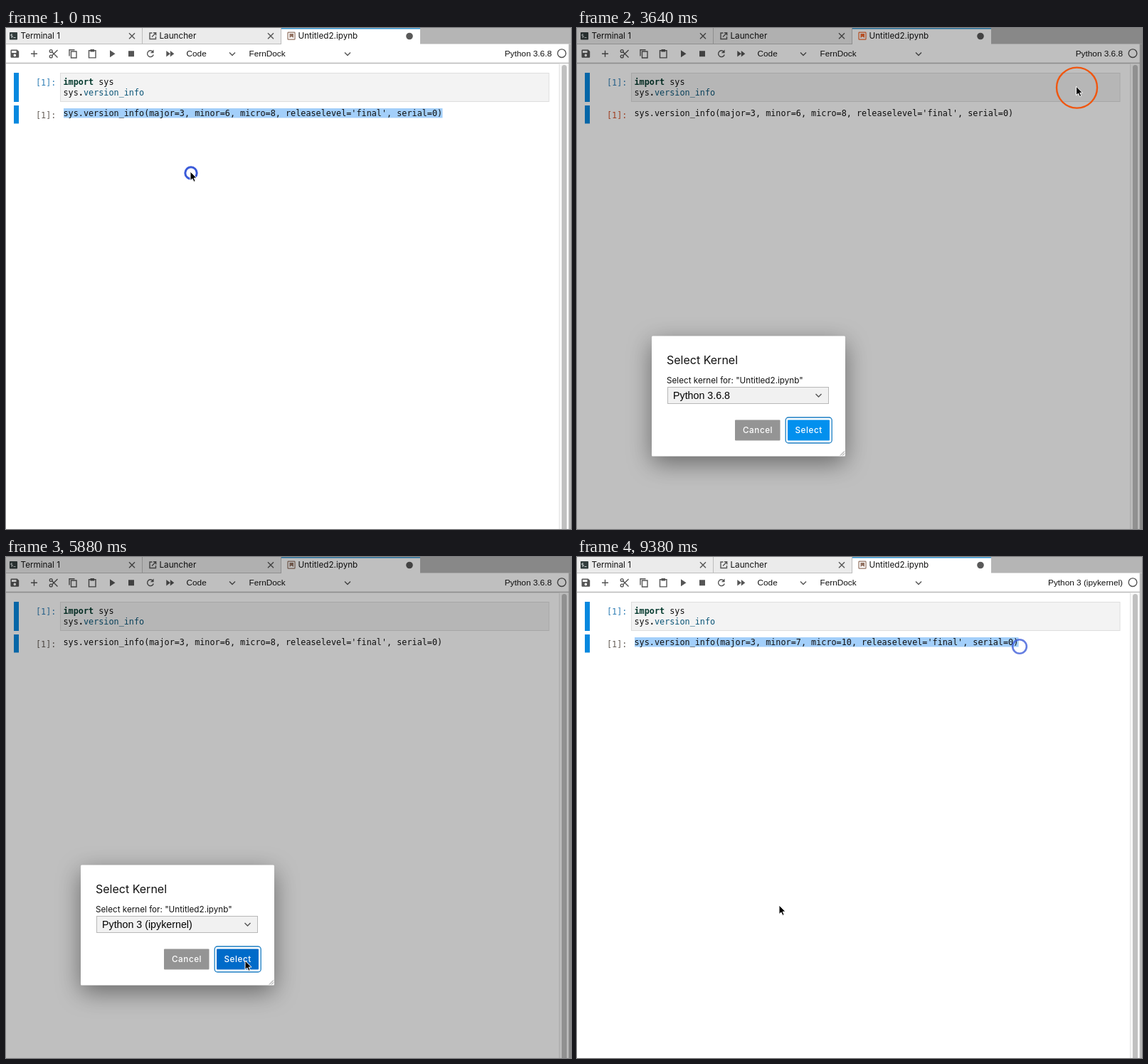
An HTML page that plays this animation: 794 by 705 pixels, repeating every 9510 ms.

```html
<!DOCTYPE html>
<html lang="en">
<head>
<meta charset="utf-8">
<title>Switching a notebook kernel</title>
<style>
  html, body { margin: 0; width: 100%; height: 100%; overflow: hidden; background: #fff; }
  svg { display: block; }
  text { white-space: pre; }
  .ui { font: 11.7px Inter, "Open Sans", sans-serif; }
  .bar { font: 11.8px "Liberation Sans", Arial, sans-serif; }
  .code { font: 11.8px "DejaVu Sans Mono", monospace; }
  .line { fill: none; stroke: #555; stroke-width: 1.4; }
</style>
</head>
<body>
<svg width="794" height="705" viewBox="0 0 794 705">
  <defs>
    <clipPath id="lensClip"><rect id="lensBox"/></clipPath>
    <filter id="shadow" x="-40%" y="-50%" width="180%" height="220%">
      <feDropShadow dx="0" dy="10" stdDeviation="17" flood-opacity=".45"/>
    </filter>
    <path id="cross" class="line" d="M-4-4 4 4M4-4-4 4"/>
    <path id="chevron" class="line" d="M-4-2 0 2 4-2"/>
  </defs>

  <g id="page">
    <rect width="794" height="705" fill="#fff"/>
    <rect width="794" height="22.5" fill="#b5b5b5"/>
    <rect width="387" height="22.5" fill="#ebebeb"/>
    <path d="M0 22.5H387M191.5 0V22M386.5 0V22" stroke="#bdbdbd" fill="none"/>
    <rect x="387" width="195" height="24" fill="#fff"/>
    <rect x="387" width="195" height="1.5" fill="#3796cf"/>

    <!-- tabs -->
    <rect x="5" y="6" width="11" height="10.5" rx=".8" fill="#333d3d"/>
    <path d="M9 9H7v2h2v2H7M10.5 13.5h3" stroke="#dfe6e6" stroke-width=".9" fill="none"/>
    <path class="line" stroke-width="1.2" d="M205.5 7H202v8.5h8.5V12M207 6.8h3.7v3.7M210.5 7 205 12.5"/>
    <g id="bookIcon">
      <rect x="396" y="6.2" width="10" height="10" rx=".8" fill="none" stroke="currentColor" stroke-width="1.2"/>
      <path d="M398.5 8h5.5v6l-2.7-2-2.8 2z" fill="currentColor"/>
    </g>
    <g class="ui" fill="#111">
      <text x="20.5" y="15">Terminal 1</text>
      <text x="215.5" y="15">Launcher</text>
      <text x="410.5" y="15">Untitled2.ipynb</text>
    </g>
    <use href="#cross" x="177" y="11.3"/>
    <use href="#cross" x="372" y="11.3"/>
    <circle cx="567" cy="11.5" r="4.8" fill="#595959"/>

    <!-- toolbar -->
    <rect y="48.7" width="791" height="1.6" fill="#bcbcbc"/>
    <path fill="#555" fill-rule="evenodd" d="M7.5 30.5h8.2l2.5 2.6v7.6q0 1-1 1H7.5q-1 0-1-1v-9.2q0-1 1-1zM8 32v3h6.5v-3zM12.3 36.6a1.8 1.8 0 1 0 .01 0z"/>
    <path class="line" d="M35 36.3h9M39.5 31.8v9"/>
    <g class="line" stroke-width="1.3">
      <circle cx="63.2" cy="32.5" r="1.9"/><circle cx="63.2" cy="40" r="1.9"/>
      <path d="M64.7 33.8 72.5 41.5M64.7 38.7 72.5 31"/>
      <path d="M89 39.5V30.7h7.5M91.5 33h7.5v9h-7.5z"/>
      <path d="M116.5 31.7h9.5v10.2h-9.5z"/>
      <path d="M206.2 33.2A4.4 4.4 0 1 0 207.2 37.5"/>
    </g>
    <path fill="#555" d="M118.5 30h5.5v3.5h-5.5zM146 31.3l7.5 5-7.5 5zM172 32.3h8v8h-8zM207.6 30.5v4.8h-4.8zM225.3 32l5.5 4.3-5.5 4.3zM230.8 32l5.5 4.3-5.5 4.3z"/>
    <rect id="kernelHover" x="692.3" y="25.2" width="80.8" height="21.6" rx="1.5" fill="#ebebeb"/>
    <g class="bar" fill="#111">
      <text x="253.5" y="40">Code</text>
      <text x="341.5" y="40">FernDock</text>
      <text id="kernel" x="767" y="40" text-anchor="end"></text>
    </g>
    <use href="#chevron" x="318" y="36.5"/>
    <use href="#chevron" x="480" y="36.5"/>
    <circle class="line" cx="781" cy="35.7" r="5.8"/>

    <!-- scrollbar -->
    <rect x="777.5" y="50.3" width="13" height="655" fill="#f8f8f8"/>
    <path d="M777.5 50.5V705" stroke="#e3e3e3"/>
    <rect x="781" y="52" width="7" height="670" rx="3.5" fill="#c0c0c0"/>
    <rect x="790.7" y="22.5" width="4" height="683" fill="#b5b5b5"/>

    <!-- cells -->
    <path fill="#0788df" d="M11 63h7v41h-7zM11 109h7v25.5h-7z"/>
    <rect x="76.5" y="63.5" width="686.5" height="40" fill="#f3f3f3" stroke="#dedede"/>
    <rect id="selection" x="81" y="113" height="13.5" fill="#a3cffa"/>
    <g class="code" fill="#111">
      <text x="42" y="80.5" fill="#307fb5">[1]:</text>
      <text id="outPrompt" x="42" y="127" fill="currentColor">[1]:</text>
      <text x="80.5" y="80"><tspan font-weight="bold" fill="#063b2f">import</tspan> sys</text>
      <text x="80.5" y="95">sys<tspan font-weight="bold">.</tspan><tspan fill="#0b5577">version_info</tspan></text>
      <text id="output" x="80.5" y="123.7"></text>
    </g>
  </g>

  <rect id="dim" width="794" height="705"/>

  <g id="lens" clip-path="url(#lensClip)"><use id="lensPage" href="#page"/></g>

  <g id="dialog">
    <rect x="105" y="433.5" width="272" height="169" rx="1.5" fill="#fff" filter="url(#shadow)"/>
    <g class="ui" fill="#111">
      <text x="126" y="473" font-size="16">Select Kernel</text>
      <text x="126" y="500">Select kernel for: "Untitled2.ipynb"</text>
    </g>
    <rect x="127.5" y="505.5" width="226" height="23" fill="#f1f1f1" stroke="#b8b8b8"/>
    <text id="choice" class="bar" x="135" y="522" style="font-size:14.25px"></text>
    <use href="#chevron" x="339.5" y="517"/>
    <rect x="222" y="551.5" width="63.5" height="29" rx="1" fill="#949494"/>
    <rect x="293.2" y="548" width="65" height="36" rx="4" fill="none" stroke="#1e7fc4" stroke-width="1.3"/>
    <rect id="selectButton" x="296" y="551.5" width="59" height="29" rx="1"/>
    <g class="ui" fill="#fff" font-weight="500" letter-spacing=".55" style="font-weight:500">
      <text x="233" y="570">Cancel</text>
      <text x="306.5" y="570">Select</text>
    </g>
    <path d="M370 601.5l6-6M373 601.5l3-3" stroke="#777" stroke-width=".9"/>
  </g>

  <circle id="press" fill="none" stroke="#3b5bd9"/>
  <circle id="halo" r="28.5" fill="none" stroke="#f0560f" stroke-width="2.4"/>
  <g id="pointer" stroke-linejoin="round">
    <path id="arrow" d="M0 0V12.6L2.9 10 5 14.4 7.2 13.4 5.2 9.1H9z" fill="#000" stroke="#fff"/>
    <path id="hand" d="M-1.2 1q0-1.5 1.2-1.5T1.2 1v4l1-.5 1.3.8 1.3-.2 1 .9 1 .2v3.2L5.5 12v1.5H-.8V12L-4.5 7.5q-.3-1.6 1.2-1.3l2.1 1.7z" fill="#fff" stroke="#111"/>
    <g id="beam" fill="none">
      <path d="M-3-6.5Q0-6.5 0-4.5 0-6.5 3-6.5M0-4.5V5M-3 7Q0 7 0 5 0 7 3 7M-2 2H2" stroke="#fff" stroke-width="2.6"/>
      <path d="M-3-6.5Q0-6.5 0-4.5 0-6.5 3-6.5M0-4.5V5M-3 7Q0 7 0 5 0 7 3 7M-2 2H2" stroke="#222" stroke-width="1.2"/>
    </g>
  </g>
</svg>

<script>
const LOOP = 9510, STEP = 140, CHAR = 7.1;
const OLD_KERNEL = 'Python 3.6.8', NEW_KERNEL = 'Python 3 (ipykernel)';
const LENS = { x: 674, y: 9.5, w: 113.6, h: 50.5, endX: 434, zoom: 3.1 };

// Pointer waypoints: time, x, y
const PATH = [
  [0, 259, 202], [140, 259, 202], [1120, 520, 148], [1960, 630, 126],
  [2520, 630, 126], [2800, 642, 136], [3080, 751.6, 37.3], [3500, 751.6, 37.3],
  [4200, 270, 468], [4480, 262, 512], [4760, 262, 512], [5180, 230, 532],
  [5740, 336, 568], [6160, 336, 568], [6860, 330, 150], [7560, 310, 94],
  [7840, 310, 94], [8260, 81, 121], [9240, 621, 124], [9380, 284, 490]
];

// Mouse presses: start and end time
const PRESSES = [[0, 2800], [8260, 9260]];
const FADE = 560;

const el = {};
document.querySelectorAll('[id]').forEach(node => el[node.id] = node);

const clamp = v => Math.min(1, Math.max(0, v));
const mix = (a, b, p) => a + (b - a) * p;
const smooth = p => p * p * (3 - 2 * p);
const ramp = (t, from, to) => smooth(clamp((t - from) / (to - from)));
const within = (t, from, to) => t >= from && t < to;

function set(node, attrs) {
  for (const name in attrs) node.setAttribute(name, attrs[name]);
}
function show(node, visible) {
  node.style.display = visible ? '' : 'none';
}
function label(node, value) {
  if (node.textContent !== value) node.textContent = value;
}

function pointerAt(t) {
  const next = PATH.findIndex(point => point[0] > t);
  if (next < 0) return PATH[PATH.length - 1].slice(1);
  const [t0, x0, y0] = PATH[next - 1], [t1, x1, y1] = PATH[next];
  const p = ramp(t, t0, t1);
  return [mix(x0, x1, p), mix(y0, y1, p)];
}

function drawPage(t) {
  const accent = within(t, 2940, 5180);
  const updated = t >= 7280;
  const version = updated ? 'minor=7, micro=10' : 'minor=6, micro=8';
  const output = `sys.version_info(major=3, ${version}, releaselevel='final', serial=0)`;
  let chars = t < 2940 ? output.length : 0;
  if (t >= 8260) {
    const edge = t > 9240 ? 621 : pointerAt(t)[0];
    chars = Math.min(output.length, Math.round((edge - 81) / CHAR));
  }
  label(el.output, output);
  label(el.kernel, t < 6300 ? OLD_KERNEL : NEW_KERNEL);
  set(el.selection, { width: Math.max(0, chars) * CHAR });
  show(el.kernelHover, within(t, 2940, 3640));
  el.bookIcon.style.color = accent ? '#f2692e' : '#927262';
  el.outPrompt.style.color = accent ? '#d4532c' : '#665e58';
}

function drawDialog(t) {
  show(el.dialog, within(t, 3640, 6160));
  label(el.choice, t < 5320 ? OLD_KERNEL : NEW_KERNEL);
  set(el.selectButton, { fill: t < 5600 ? '#0290ee' : '#006bc9' });
}

// Magnifies the kernel name; returns the mapping used for the pointer.
function drawLens(t) {
  const p = ramp(t, 2660, 3080) * (1 - ramp(t, 3360, 3640));
  const zoom = mix(1, LENS.zoom, p), x = mix(LENS.x, LENS.endX, p);
  const dx = x - zoom * LENS.x, dy = LENS.y * (1 - zoom);
  show(el.lens, p > 0);
  set(el.lensBox, { x, y: LENS.y, width: LENS.w * zoom, height: LENS.h * zoom });
  set(el.lensPage, { transform: `translate(${dx} ${dy}) scale(${zoom})` });
  set(el.dim, { opacity: within(t, 3640, 6160) ? 0.25 : 0.185 * p });
  return ([px, py]) => t >= 2940 && p > 0 ? [px * zoom + dx, py * zoom + dy] : [px, py];
}

function drawPointer(t, project) {
  const [x, y] = project(pointerAt(t));
  const hand = within(t, 2940, 3500);
  const beam = within(t, 7000, 9200);
  set(el.pointer, { transform: `translate(${x} ${y})` });
  show(el.hand, hand);
  show(el.beam, beam);
  show(el.arrow, !hand && !beam);
  set(el.halo, { cx: x + 1, cy: y + 2 });
  show(el.halo, within(t, 2940, 5180));

  const press = PRESSES.find(([from, to]) => within(t, from, to + FADE));
  show(el.press, press);
  if (!press) return;
  const age = Math.max(0, t - press[1]);
  const [cx, cy] = age ? pointerAt(Math.min(press[1], 9240)) : [x, y];
  set(el.press, {
    cx: cx + 1, cy: cy + 2, r: 8.2 + age * 0.0135,
    opacity: 1 - age / FADE, 'stroke-width': 3 - age / 280
  });
}

function render(time) {
  const t = Math.floor((time % LOOP) / STEP) * STEP;
  drawPage(t);
  drawDialog(t);
  drawPointer(t, drawLens(t));
}

let start;
function tick(now) {
  start ??= now;
  render(now - start);
  requestAnimationFrame(tick);
}
render(0);
requestAnimationFrame(tick);
</script>
</body>
</html>
```
